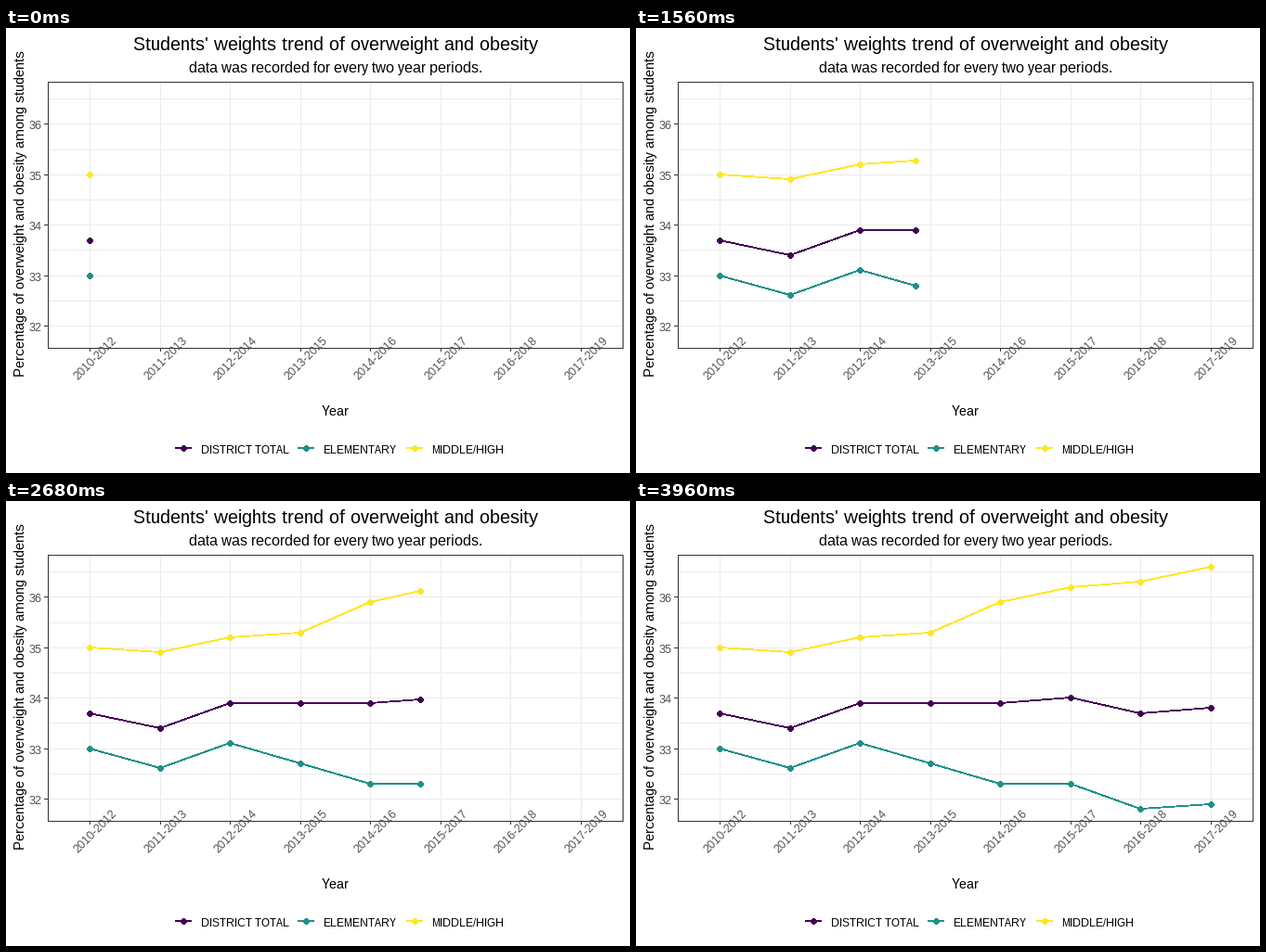
These frames come from a looping animation (672x480 px, 4 s). A matplotlib script:

```python
import matplotlib as mpl
import matplotlib.pyplot as plt
import numpy as np
from matplotlib.animation import FuncAnimation
from matplotlib.patches import PathPatch
from matplotlib.path import Path
from matplotlib.transforms import Affine2D

mpl.rcParams.update({
    "font.family": "Liberation Sans",
    "text.hinting": "native",
    "text.hinting_factor": 1,
    "text.kerning_factor": 6,
    "path.simplify": False,
})

W, H, DPI = 672, 480, 96
PX = 72 / DPI                                 # points per pixel
LEFT, RIGHT, TOP, BOTTOM = 45, 664, 58, 345   # panel border
Y_TOP, Y_BOTTOM = 57.8, 345.03                # exact span of the value axis
GRID, BORDER, LABEL = "#EBEBEB", "#333333", "#4D4D4D"

# Without antialiasing every touched pixel is filled, so these sizes
# give lines 2 px thick and dots 7 px across.
LINE, RADIUS = 0.8, 2.9

YEARS = [f"{y}-{y + 2}" for y in range(2010, 2018)]
SERIES = [
    ("DISTRICT TOTAL", "#440154", [33.7, 33.4, 33.9, 33.9, 33.9, 34.0, 33.7, 33.8]),
    ("ELEMENTARY", "#21908C", [33.0, 32.6, 33.1, 32.7, 32.3, 32.3, 31.8, 31.9]),
    ("MIDDLE/HIGH", "#FDE725", [35.0, 34.9, 35.2, 35.3, 35.9, 36.2, 36.3, 36.6]),
]
KEYS = [0, 14, 28, 42, 57, 71, 85, 99]        # frame at which each year is reached
FRAMES = 100


def to_x(k):
    return np.rint(LEFT + (np.asarray(k) + 0.6) * (RIGHT - LEFT) / 8.2)


def to_y(v):
    return np.rint(Y_BOTTOM - (np.asarray(v) - 31.56) * (Y_BOTTOM - Y_TOP) / 5.28)


fig = plt.figure(figsize=(W / DPI, H / DPI), dpi=DPI, facecolor="white")
ax = fig.add_axes([0, 0, 1, 1])
ax.set(xlim=(0, W), ylim=(H, 0))
ax.axis("off")


def stroke(xs, ys, color, width=1, z=1):
    return ax.plot(xs, ys, color=color, lw=width * PX, antialiased=False,
                   snap=False, solid_capstyle="butt", solid_joinstyle="round",
                   zorder=z)[0]


def dot_path(xs, ys):
    circle = Path.unit_circle()
    return Path.make_compound_path(*[
        circle.transformed(Affine2D().scale(RADIUS).translate(x + 0.5, y + 0.5))
        for x, y in zip(xs, ys)])


def dots(xs, ys, color):
    return ax.add_patch(PathPatch(dot_path(xs, ys), fc=color, ec="none", lw=0,
                                  antialiased=False, snap=False, zorder=4))


def label(x, y, s, size, color="black", ha="center", angle=0):
    ax.text(x, y, s, fontsize=size * PX, color=color, ha=ha, va="baseline",
            rotation=angle, rotation_mode="anchor", zorder=6)


def hline(y, x0, x1, color, z=1):
    stroke([x0, x1], [y + 0.5] * 2, color, z=z)


def vline(x, y0, y1, color, z=1):
    stroke([x + 0.5] * 2, [y0, y1], color, z=z)


# Grid, ticks and tick labels
for v in np.arange(32, 37, 0.5):
    y = to_y(v)
    hline(y, LEFT, RIGHT, GRID)
    if v == int(v):
        hline(y, LEFT - 4, LEFT, BORDER, 5)
        label(38.4, y + 6, str(int(v)), 12, LABEL, "right")

for k, year in enumerate(YEARS):
    x = to_x(k)
    vline(x, TOP, BOTTOM, GRID)
    vline(x, BOTTOM, BOTTOM + 4, BORDER, 5)
    label(x + 9, 358.5, year, 12, LABEL, angle=45)

# Panel border
for y in (TOP, BOTTOM):
    hline(y, LEFT, RIGHT + 1, BORDER, 5)
for x in (LEFT, RIGHT):
    vline(x, TOP, BOTTOM + 1, BORDER, 5)

# Titles
MID = (LEFT + RIGHT + 1) / 2
label(MID, 24, "Students' weights trend of overweight and obesity", 20)
label(MID, 48, "data was recorded for every two year periods.", 16)
label(MID, 418, "Year", 15)
label(20, 200.5, "Percentage of overweight and obesity among students", 15, angle=90)

# Legend
for (name, color, _), x in zip(SERIES, (191, 323, 440)):
    stroke([x - 9, x + 9], [453, 453], color, LINE, 3)
    dots([x], [453], color)
    label(x + 18.5, 459, name, 12, ha="left")

lines = [stroke([], [], color, LINE, 3) for _, color, _ in SERIES]
marks = [dots([0], [0], color) for _, color, _ in SERIES]


def update(i):
    pos = np.interp(i, KEYS, range(8))
    ks = np.unique(np.append(np.arange(int(pos) + 1), pos))
    xs = to_x(ks)
    for (_, _, values), line, mark in zip(SERIES, lines, marks):
        ys = to_y(np.interp(ks, range(8), values))
        line.set_data(xs, ys)
        mark.set_path(dot_path(xs, ys))
    return lines + marks


anim = FuncAnimation(fig, update, frames=FRAMES, interval=40, repeat=True,
                     repeat_delay=0, blit=False)
plt.show()
```
